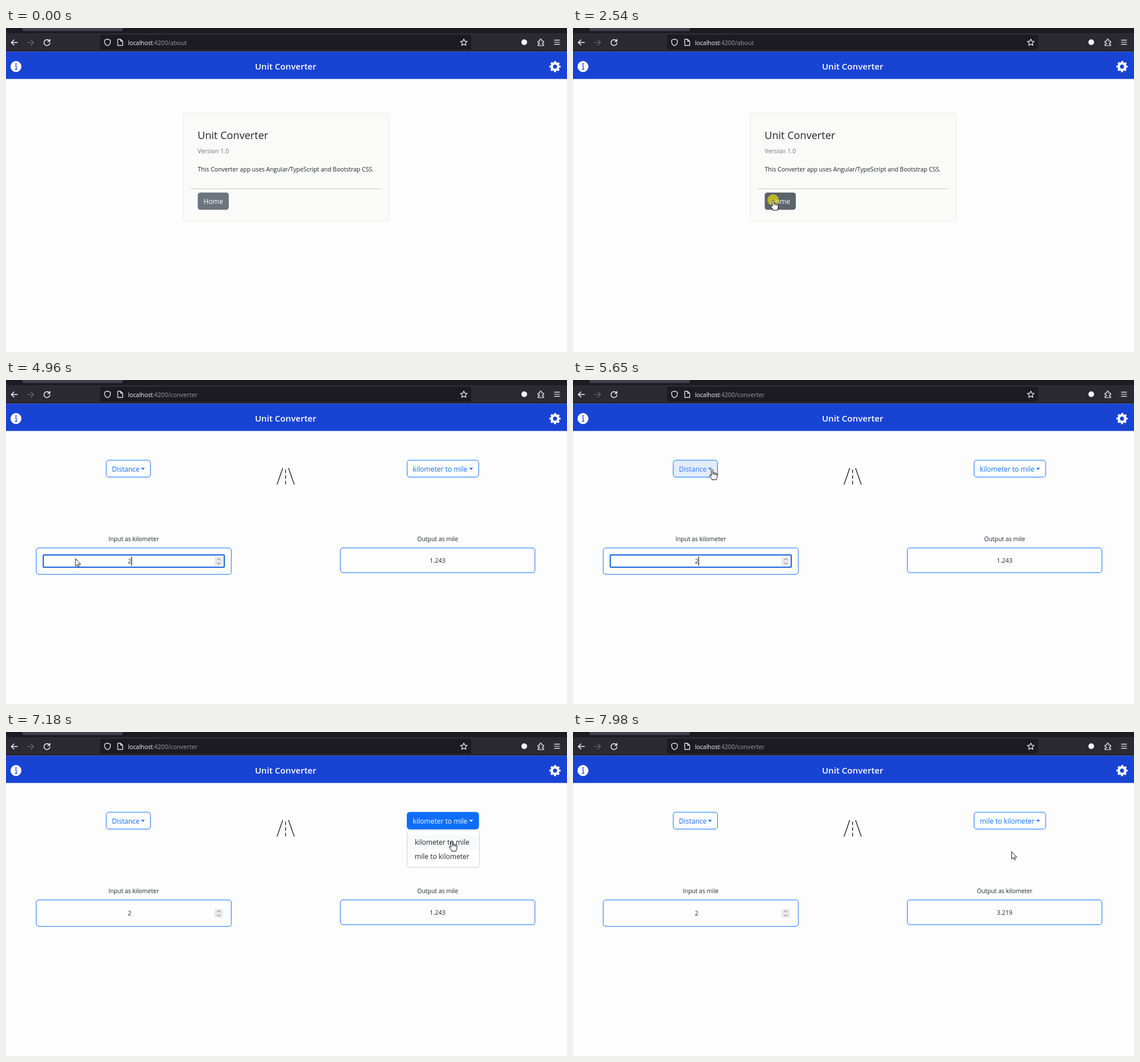
These frames come from a looping animation (984x569 px, 8000 ms). An HTML page:

```html
<!DOCTYPE html>
<html lang="en">
<head>
<meta charset="utf-8">
<title>Unit Converter</title>
<style>
html, body { margin: 0; width: 100%; height: 100%; overflow: hidden; background: #fdfdfd; }
svg { display: block; width: 984px; height: 569px; font-family: "Open Sans", "Noto Sans", sans-serif; }
text { white-space: pre; }
.mid { text-anchor: middle; }
.label { font-size: 10.45px; fill: #212529; }
.num { font-size: 10.75px; fill: #212529; }
.btn { font-size: 12.1px; }
.icon { fill: none; stroke: #fbfbfe; stroke-width: 1.2; stroke-linecap: round; stroke-linejoin: round; }
.box { fill: #fdfdfd; stroke: #0d6efd; }
</style>
</head>
<body>
<svg viewBox="0 0 984 569">
  <rect width="984" height="569" fill="#fdfdfd"/>

  <!-- browser bar -->
  <rect width="984" height="9" fill="#1c1b22"/>
  <rect x="29" y="-6" width="176" height="11.5" rx="3" fill="#42414d"/>
  <rect y="9" width="984" height="32" fill="#2b2a33"/>
  <rect y="40" width="984" height="1.5" fill="#111016"/>
  <rect x="165" y="12" width="651" height="26" rx="3.5" fill="#1c1b22"/>
  <g class="icon">
    <path d="M20 25.5H9.5M14 21L9.3 25.5L14 30" stroke-width="1.4"/>
    <path d="M37.5 25.5H48M43.7 21L48.4 25.5L43.7 30" stroke="#6d6c75"/>
    <path d="M76.3 23A5.2 5.2 0 1 0 77 26.2M77 20V23.6H73.3" stroke-width="1.4"/>
    <path d="M178 19.4L183 21.3V24.6C183 28 181 30 178 31.2C175 30 173 28 173 24.6V21.3Z"/>
    <path d="M196 19.6H201L204.6 23.2V30.6H196ZM201 19.8V23.2H204.4"/>
    <path id="star"/>
    <path d="M933.2 23H936.2V21A1.7 1.7 0 0 1 939.6 21V23H943V26.2H941.4A1.6 1.6 0 0 0 941.4 29H943V31H933.2V28.6H934.6A1.4 1.4 0 0 0 934.6 25.8H933.2Z"/>
    <path d="M962 21.3H971M962 25H971M962 28.7H971"/>
  </g>
  <circle cx="909" cy="25" r="5" fill="#fbfbfe"/>
  <text x="214" y="29.6" font-size="10.4" fill="#fbfbfe">localhost</text>
  <text id="path" x="256.8" y="29.6" font-size="10.7" fill="#9d9ca5"></text>

  <!-- page header -->
  <rect y="41.5" width="984" height="48" fill="#1843d3"/>
  <text class="mid" x="490.5" y="72.7" font-size="15.1" font-weight="600" fill="#fff">Unit Converter</text>
  <circle cx="17.5" cy="67.7" r="9.6" fill="#fff"/>
  <circle cx="17.6" cy="63.2" r="1.3" fill="#1843d3"/>
  <path d="M15.6 66.4H18V72.4M15.4 72.6H20" fill="none" stroke="#1843d3" stroke-width="1.3"/>
  <g fill="none" stroke="#fff">
    <circle cx="963" cy="67.8" r="5.7" stroke-width="4.2"/>
    <circle cx="963" cy="67.8" r="8.3" stroke-width="3" stroke-dasharray="3.6 2.919" stroke-dashoffset="1.8"/>
  </g>

  <g id="about">
    <rect x="310.5" y="150" width="361" height="188.7" rx="3" fill="#fafaf9" stroke="#e9e9e8"/>
    <text x="336" y="194.8" font-size="18.1" fill="#212529">Unit Converter</text>
    <text x="336.3" y="219.6" font-size="10.6" fill="#6c757d">Version 1.0</text>
    <text x="336.3" y="252.2" font-size="10.48" fill="#212529">This Converter app uses Angular/TypeScript and Bootstrap CSS.</text>
    <path d="M324 282.3H658" stroke="#c6c6c6"/>
    <rect id="home" x="336.3" y="289" width="54.5" height="30.3" rx="4.5"/>
    <text class="btn mid" x="363.6" y="308.9" fill="#fff">Home</text>
  </g>

  <g id="converter">
    <g id="unit">
      <rect x="175.8" y="140.9" width="77.6" height="29.6" rx="4.5" stroke="#0d6efd"/>
      <text class="btn" x="185.8" y="161">Distance</text>
      <path d="M236.8 154.3H243.6L240.2 157.8Z"/>
    </g>
    <g id="pair">
      <rect x="703.5" y="140.9" width="125.6" height="29.6" rx="4.5" stroke="#0d6efd"/>
      <text class="btn" id="pairText" x="713.6" y="161"></text>
      <path d="M812.4 154.3H819.2L815.8 157.8Z"/>
    </g>
    <g fill="none" stroke="#111" stroke-width="1.3">
      <path d="M475.4 183.6L485.4 154.8M505.6 183.6L495.6 154.8"/>
      <path d="M490.4 157.4V183.4" stroke-dasharray="6.2 3.6"/>
    </g>
    <text class="label mid" id="inLabel" x="224" y="282.8"></text>
    <text class="label mid" id="outLabel" x="757.2" y="282.8"></text>
    <rect class="box" x="53" y="294.9" width="342.2" height="46.4" rx="4.5"/>
    <rect class="box" x="586.4" y="294.9" width="341.4" height="43.4" rx="4.5"/>
    <rect id="focus" x="65.4" y="307.2" width="317.4" height="21.6" rx="1" fill="#fff" stroke="#0a5cd8" stroke-width="2"/>
    <rect x="366" y="311" width="14.3" height="15" fill="#e9e9ed"/>
    <path d="M370.4 316.3L373.2 313.5L376 316.3M370.4 320.7L373.2 323.5L376 320.7" fill="none" stroke="#5b5b66"/>
    <rect id="sel" x="213.6" y="310" width="6.6" height="16" fill="#0078d7"/>
    <text class="num mid" id="inNum" x="216.9" y="322.4"></text>
    <rect id="caret" x="220" y="310" width="1" height="16" fill="#000"/>
    <text class="num mid" id="outNum" x="757" y="321"></text>
    <g id="menu">
      <rect x="703.5" y="172.5" width="127" height="65" rx="4.5" fill="#fff" stroke="#cfd0d1"/>
      <rect id="item" x="704" width="126" height="25.4" fill="#f8f9fa"/>
      <g class="btn" fill="#212529">
        <text x="717" y="197.9">kilometer to mile</text>
        <text x="717" y="223.4">mile to kilometer</text>
      </g>
    </g>
  </g>

  <circle id="press" r="10" fill="#f8f000"/>
  <g id="cursor" stroke="#000" stroke-linejoin="round" stroke-linecap="round">
    <path id="arrow" d="M.4 .4V13.2L3.2 10.6L5.2 14.8L7 14L5.1 9.9H9Z" fill="#fff" stroke-width=".9"/>
    <g id="hand" stroke-width="1">
      <path d="M-1.6 11V1.6C-1.6 -.3 1.4 -.3 1.4 1.6V6.2C1.6 5 4 5.2 4.1 6.7C4.6 5.8 6.6 6 6.7 7.5C7.4 6.8 9 7.2 9 8.7V12.6C9 15 7.4 16 7.4 18H-.2C-.4 15.6 -4.4 12.6 -4.4 10.7C-4.2 9.2 -2.2 9.4 -1.6 11Z" fill="#fff"/>
      <path d="M1.4 6V9M4.1 6.7V9.4M6.7 7.5V9.8" fill="none"/>
    </g>
    <path id="beam" d="M-3 -7.5H-1.2L0 -6.6L1.2 -7.5H3M0 -6.6V6.6M-3 7.5H-1.2L0 6.6L1.2 7.5H3" fill="none" stroke-width="1"/>
  </g>
</svg>
<script>
const el = id => document.getElementById(id);
const show = (id, on) => el(id).style.display = on ? "" : "none";
const within = (t, a, b) => t >= a && t < b;
const LOOP = 8000;

// pointer: time, x, y
const track = [
  [500, 811, 562], [700, 610, 455], [900, 400, 360], [1020, 325, 337], [1140, 369, 320],
  [1670, 369, 320], [1850, 351, 302], [3160, 351, 302], [3300, 338, 287], [3560, 285, 302],
  [3860, 217, 320], [3970, 217, 320], [4120, 111, 325], [4850, 111, 325], [5100, 150, 280],
  [5350, 218, 192], [5560, 243, 151], [5590, 243, 152], [5650, 244, 157], [5790, 250, 164],
  [6320, 250, 164], [6450, 480, 129], [6640, 826, 143], [6760, 803, 158], [6900, 785, 163],
  [7080, 785, 163], [7180, 782, 191], [7300, 779, 208], [7400, 777, 207], [7940, 777, 207],
  [7960, 772, 209], [7980, 769, 210], [8000, 769, 210]
];
const shapes = [
  [0, "arrow"], [1760, "hand"], [3160, "arrow"], [3660, "beam"], [4950, "arrow"],
  [5590, "hand"], [6340, "arrow"], [6600, "hand"], [7950, "arrow"]
];
// press, release, faded out
const presses = [[2540, 2620, 2730], [3880, 4110, 4190], [6960, 7030, 7120], [7560, 7640, 7780]];

function slope(i, k) {
  const p = track[i], a = track[i - 1] || p, b = track[i + 1] || p;
  const still = q => q !== p && q[1] === p[1] && q[2] === p[2];
  return still(a) || still(b) ? 0 : (b[k] - a[k]) / (b[0] - a[0]);
}

function pointer(t) {
  let i = 0;
  while (i < track.length - 2 && t >= track[i + 1][0]) i++;
  const a = track[i], b = track[i + 1], d = b[0] - a[0];
  const u = Math.max(0, Math.min(1, (t - a[0]) / d)), v = 1 - u;
  return [1, 2].map(k =>
    v * v * (1 + 2 * u) * a[k] + u * u * (3 - 2 * u) * b[k] +
    d * u * v * (v * slope(i, k) - u * slope(i + 1, k)));
}

function ramp(t, a, b) {
  const u = Math.max(0, Math.min(1, (t - a) / (b - a)));
  return u * u * (3 - 2 * u);
}

function mix(a, b, u) {
  return `rgb(${a.map((c, i) => Math.round(c + (b[i] - c) * u))})`;
}

const blue = [13, 110, 253], white = [253, 253, 253];
function paint(id, u) {
  const [box, label, tri] = el(id).children;
  box.setAttribute("fill", mix(white, blue, u));
  for (const part of [label, tri]) part.setAttribute("fill", mix(blue, white, u));
}

function render(t) {
  const home = t < 2620, swapped = t >= 7660;
  const typed = t >= 4770;
  const [from, to] = swapped ? ["mile", "kilometer"] : ["kilometer", "mile"];
  const selected = within(t, 3990, 4770);

  show("about", home);
  show("converter", !home);
  el("path").textContent = home ? ":4200/about" : ":4200/converter";
  el("home").setAttribute("fill", mix([108, 117, 125], [92, 99, 106], ramp(t, 1750, 1900)));

  el("pairText").textContent = `${from} to ${to}`;
  el("inLabel").textContent = `Input as ${from}`;
  el("outLabel").textContent = `Output as ${to}`;
  const n = typed ? 2 : 1;
  el("inNum").textContent = n;
  el("outNum").textContent = (swapped ? n * 1.609344 : n / 1.609344).toFixed(3);

  paint("unit", ramp(t, 5620, 5770) - ramp(t, 6340, 6490));
  paint("pair", ramp(t, 6645, 6795) - ramp(t, 7660, 7800));
  show("focus", within(t, 3880, 6960));
  show("sel", selected);
  el("inNum").style.fill = selected ? "#fff" : "";
  show("caret", within(t, 3880, 3990) || within(t, 4770, 5030) || within(t, 5550, 6080) || within(t, 6660, 6960));

  const [x, y] = pointer(t);
  show("menu", within(t, 7060, 7660));
  show("item", y > 180);
  el("item").setAttribute("y", y < 206 ? 180.6 : 206);

  const shape = shapes.filter(s => t >= s[0]).pop()[1];
  for (const id of ["arrow", "hand", "beam"]) show(id, id === shape);
  const at = `translate(${x.toFixed(1)} ${y.toFixed(1)})`;
  show("cursor", t >= 500);
  el("cursor").setAttribute("transform", at);

  const hit = presses.find(p => within(t, p[0], p[2]));
  show("press", hit);
  if (hit) {
    el("press").setAttribute("transform", at);
    el("press").setAttribute("opacity", 0.6 * (1 - ramp(t, hit[1], hit[2])));
  }
}

el("star").setAttribute("d", "M" + Array.from({ length: 10 }, (_, i) => {
  const a = Math.PI * (i / 5 - 0.5), r = i % 2 ? 2.9 : 6.2;
  return `${(803 + r * Math.cos(a)).toFixed(2)} ${(25.5 + r * Math.sin(a)).toFixed(2)}`;
}).join("L") + "Z");

function tick() {
  render(performance.now() % LOOP);
  requestAnimationFrame(tick);
}
tick();
</script>
</body>
</html>
```
